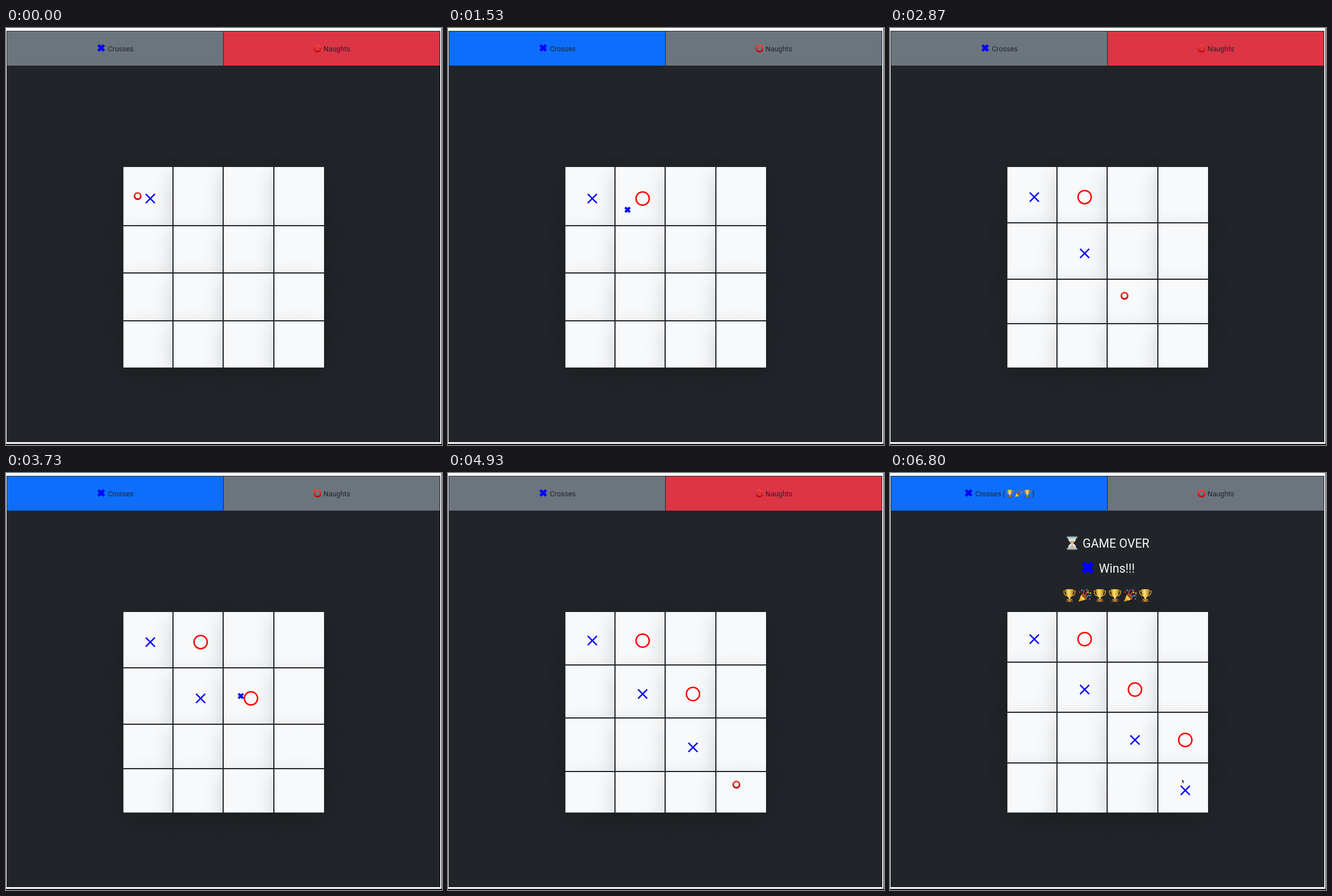
An HTML page for the animation above (8 s loop, 765 by 732 pixels).

```html
<!DOCTYPE html>
<html lang="en">
<head>
<meta charset="utf-8">
<title>Naughts and crosses</title>
<style>
html, body { margin: 0; width: 100%; height: 100%; overflow: hidden; background: #fff; }
#stage { position: relative; width: 765px; height: 732px; overflow: hidden; background: #fff; }
#stage div, svg { position: absolute; box-sizing: border-box; }
#page { left: 1px; top: 5px; width: 761px; height: 722px; background: #212529; }
#right { left: 764px; top: 0; width: 1px; height: 732px; background: #212529; }
#foot { left: 0; top: 730px; width: 765px; height: 2px; background: #17181c; }
.tab { top: 5px; height: 62px; border: 1px solid #212529; }
.cell { background: #f8f9fa; border: 1px solid #212529; box-shadow: 0 12.5px 37px rgba(0, 0, 0, .175); }
svg { left: 0; top: 0; font-family: Roboto, sans-serif; }
</style>
</head>
<body>
<div id="stage">
  <div id="page"></div><div id="right"></div><div id="foot"></div>
  <div class="tab" id="tabX" style="left:1px;width:381px"></div>
  <div class="tab" id="tabO" style="left:381px;width:381px"></div>
  <div id="board"></div>
  <svg width="765" height="732" viewBox="0 0 765 732">
    <defs>
      <linearGradient id="red" x1="0" y1="0" x2="0" y2="1">
        <stop offset="0" stop-color="#f44336"/><stop offset="1" stop-color="#c4080d"/>
      </linearGradient>
      <linearGradient id="gold">
        <stop offset="0" stop-color="#c98b12"/><stop offset=".4" stop-color="#ffe27a"/><stop offset="1" stop-color="#b87a0c"/>
      </linearGradient>
      <path id="heavy" d="M-5-5L5 5M5-5L-5 5" stroke="#00f" stroke-width="5"/>
      <circle id="ring" r="5.5" fill="none" stroke="url(#red)" stroke-width="3"/>
      <path id="thin" d="M-8-8L8 8M8-8L-8 8" stroke="#00f" stroke-width="2.5"/>
      <circle id="round" r="11.6" fill="none" stroke="#f00" stroke-width="2.5"/>
      <g id="cup">
        <path d="M-6-8H-10Q-10 0-4 1M6-8H10Q10 0 4 1" fill="none" stroke="#c9901c" stroke-width="1.7"/>
        <path d="M-7-11H7Q7 1 1.5 3.5V7H-1.5V3.5Q-7 1-7-11Z" fill="url(#gold)"/>
        <path d="M-4 6H4L5 8H-5Z" fill="#c9901c"/>
        <path d="M-6 7.5H6V11.5H-6Z" fill="#6d4426"/>
        <path d="M-2.5 8.6H2.5V10.3H-2.5Z" fill="#e5b74a"/>
      </g>
      <g id="popper">
        <path d="M-11 11L-5-3Q2 0 4 6Z" fill="#f9a825"/>
        <path d="M-8 4Q-4 6-3 9L0 7.5Q-2 3-6.500 0Z" fill="#ffcf4a"/>
        <ellipse cx="-.5" cy="1.500" rx="6.2" ry="2.500" transform="rotate(45 -.5 1.5)" fill="#8a4b12"/>
        <path d="M-1 0Q-4-6 0-10M1 1Q2-6 8-9" fill="none" stroke="#e0453a" stroke-width="1.700"/>
        <path d="M3 3Q6-2 11 1" fill="none" stroke="#3d9be9" stroke-width="1.7"/>
        <g fill="#e0453a"><circle cx="-9" cy="-6" r="1.3"/><circle cx="9" cy="6" r="1.4"/></g>
        <g fill="#3d9be9"><circle cx="-5" cy="-9" r="1.4"/><circle cx="4" cy="-10" r="1.3"/></g>
        <g fill="#f9b93a"><circle cx="10" cy="-4" r="1.4"/><circle cx="6" cy="-5" r="1.2"/></g>
      </g>
      <g id="glass">
        <path d="M-7-9H7Q7-3 1.500 0Q7 3 7 9H-7Q-7 3-1.500 0Q-7-3-7-9Z" fill="#cfe3ee"/>
        <path d="M-5-4H5L.7 0V4L5 9H-5L-.7 4V0Z" fill="#e9b257"/>
        <path d="M-9-11.500H9V-8.500H-9ZM-9 8.500H9V11.500H-9Z" fill="#a9bcc6"/>
      </g>
    </defs>
    <g font-size="12.5" fill="#212529">
      <g id="play"><use href="#heavy" x="167" y="35"/><text x="178.700" y="40.500">Crosses</text></g>
      <g id="won">
        <use href="#heavy" x="138" y="35"/><text x="149.500" y="40.500">Crosses (</text><text x="249" y="40.500">)</text>
        <use href="#cup" transform="translate(210.500 36) scale(.58)"/>
        <use href="#popper" transform="translate(225.500 36) scale(.58)"/>
        <use href="#cup" transform="translate(241 36) scale(.58)"/>
      </g>
      <use href="#ring" transform="translate(546.500 36)"/>
      <text x="557" y="40.500">Naughts</text>
    </g>
    <g id="over" font-size="21.200" fill="#f8f9fa">
      <use href="#glass" x="319.500" y="123"/><text x="338" y="130.700">GAME OVER</text>
      <use href="#heavy" transform="translate(347 166) scale(1.62)"/><text x="366.500" y="174.700">Wins!!!</text>
    </g>
    <g id="marks"></g>
    <use id="pointer"/>
    <path id="arrow" d="M512.500 537.500V543.500L513.800 542.500L514.800 545L515.800 544.500L514.800 542.200H516.300Z" fill="#111" stroke="#fff" stroke-width=".3"/>
  </svg>
</div>
<script>
const $ = id => document.getElementById(id);
const LOOP = 8000, TICK = 1000 / 15;
const COLS = [205, 293, 381, 470, 559];
const TOP = 243, HEIGHT = 354, EXTRA = 20.6;
// turns: click tick, tick the board reacts, row, column
const TURNS = [[-1, -1, 0, 0], [22, 23, 0, 1], [34, 35, 1, 1], [56, 56, 1, 2],
  [66, 67, 2, 2], [88, 89, 2, 3], [101, 102, 3, 3]];
// pointer path: tick, x, y
const PATH = [[0, 231, 295], [9, 309, 387], [11, 309, 387], [16, 299, 345], [18, 315, 316],
  [22, 315, 316], [29, 325, 400], [34, 325, 400], [44, 414, 472], [48, 414, 472],
  [50, 406, 425], [51, 412.5, 393], [56, 412.5, 393], [61, 417, 478], [66, 417, 478],
  [74, 506, 547], [80, 506, 547], [85, 506, 482], [88, 506, 482], [96, 513, 547], [120, 513, 547]];

function make(parent, tag) {
  const ns = parent.namespaceURI;
  return parent.appendChild(document.createElementNS(ns, tag));
}
const cells = [];
for (let i = 0; i < 16; i++) {
  const cell = make($("board"), "div");
  cell.className = "cell";
  cells.push(cell);
}
const marks = TURNS.map((turn, i) => {
  const mark = make($("marks"), "use");
  mark.setAttribute("href", i % 2 ? "#round" : "#thin");
  return mark;
});
for (let i = 0; i < 6; i++) {
  const prize = make($("over"), "use");
  prize.setAttribute("href", i % 3 === 1 ? "#popper" : "#cup");
  prize.setAttribute("transform", `translate(${315 + 26.6 * i} 215)`);
}

function pointerAt(tick) {
  let i = 1;
  while (i < PATH.length - 1 && PATH[i][0] < tick) i++;
  const [t0, x0, y0] = PATH[i - 1], [t1, x1, y1] = PATH[i];
  const p = (tick - t0) / (t1 - t0), e = p * p * (3 - 2 * p);
  return [x0 + (x1 - x0) * e, y0 + (y1 - y0) * e];
}

function rowBounds(filled) {
  const base = (HEIGHT - EXTRA * filled) / 4, rows = [TOP];
  for (let r = 0; r < 4; r++) rows.push(rows[r] + base + (r < filled ? EXTRA : 0));
  return rows;
}

const show = (id, on) => $(id).style.display = on ? "" : "none";

function draw(tick) {
  const placed = TURNS.filter(t => t[1] <= tick).length;
  const clicked = TURNS.filter(t => t[0] <= tick).length;
  const over = placed === TURNS.length;
  const rows = rowBounds(TURNS[placed - 1][2] + 1);
  cells.forEach((cell, i) => {
    const c = i % 4, r = i >> 2, y = Math.round(rows[r]);
    cell.style.left = COLS[c] + "px";
    cell.style.top = y + "px";
    cell.style.width = COLS[c + 1] - COLS[c] + "px";
    cell.style.height = Math.round(rows[r + 1]) - y + "px";
  });
  marks.forEach((mark, i) => {
    const [, , r, c] = TURNS[i];
    mark.style.display = i < placed ? "" : "none";
    mark.setAttribute("transform", `translate(${253.2 + 88.3 * c} ${(rows[r] + rows[r + 1]) / 2 + 4.4})`);
  });
  const crossTurn = over || placed % 2 === 0;
  $("tabX").style.background = crossTurn ? "#0d6efd" : "#6c757d";
  $("tabO").style.background = crossTurn ? "#6c757d" : "#dc3545";
  show("play", !over);
  show("won", over);
  show("over", over);

  const done = clicked === TURNS.length, [x, y] = pointerAt(tick), cross = clicked % 2 === 0;
  show("arrow", done);
  show("pointer", !done);
  $("pointer").setAttribute("href", cross ? "#heavy" : "#ring");
  $("pointer").setAttribute("transform", cross ? `translate(${x - .5} ${y - 1.5}) scale(.82)` : `translate(${x} ${y})`);
}

const start = performance.now();
function frame() {
  const t = (performance.now() - start) % LOOP;
  draw(Math.floor((t + 4) / TICK));
  requestAnimationFrame(frame);
}
draw(0);
requestAnimationFrame(frame);
</script>
</body>
</html>
```
